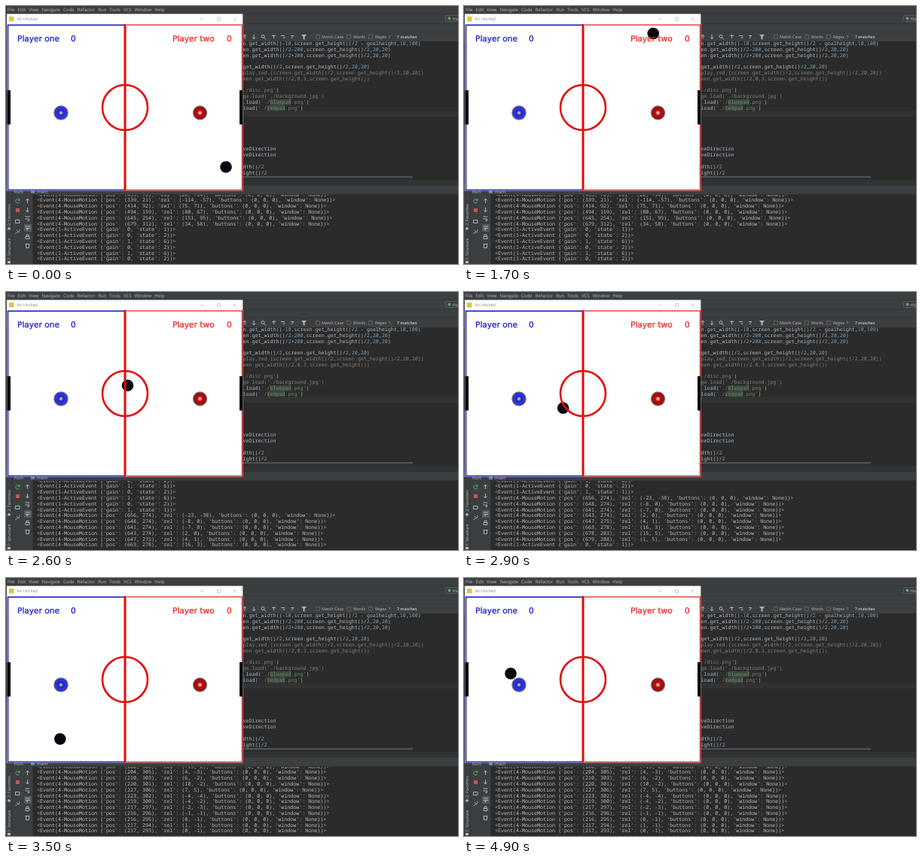
Animation, 600 px wide and 343 px high, one loop 5 s. Source, as an HTML page:

```html
<!DOCTYPE html>
<html lang="en">
<head>
<meta charset="utf-8">
<title>Air Hockey!</title>
<style>
html, body { margin: 0; width: 100%; height: 100%; overflow: hidden; background: #2b2b2b; }
svg { display: block; width: 600px; height: 343px; }
text { white-space: pre; text-rendering: geometricPrecision; }
.ui { font: 6px "Open Sans", "Noto Sans", sans-serif; fill: #bbb; }
.small { font-size: 5.4px; }
.mono { font: 6.68px "Noto Sans Mono", "DejaVu Sans Mono", monospace; fill: #a9b7c6; }
.score { font: 10.6px "DejaVu Sans", sans-serif; stroke-width: .3; }
.dim { fill: #808080; }
.str { fill: #748769; }
.num { fill: #7a9db8; }
.icons { fill: none; stroke: #afb1b3; }
</style>
</head>
<body>
<svg viewBox="0 0 600 343">
  <defs>
    <clipPath id="termClip"><rect x="36" y="251.2" width="564" height="92"/></clipPath>
    <clipPath id="fieldClip"><rect x="1" y="24" width="313" height="221.5"/></clipPath>
    <radialGradient id="blue">
      <stop offset="0" stop-color="#d0d4e0"/><stop offset=".2" stop-color="#8088c0"/>
      <stop offset=".35" stop-color="#2020b8"/><stop offset=".7" stop-color="#3434f0"/><stop offset="1" stop-color="#2020c0"/>
    </radialGradient>
    <radialGradient id="red">
      <stop offset="0" stop-color="#ffe0e0"/><stop offset=".2" stop-color="#e08080"/>
      <stop offset=".4" stop-color="#b00808"/><stop offset=".7" stop-color="#b40c0c"/><stop offset="1" stop-color="#860000"/>
    </radialGradient>
  </defs>

  <!-- editor -->
  <rect width="600" height="343" fill="#2b2b2b"/>
  <rect x="314" y="139.5" width="286" height="7.5" fill="#323232"/>
  <path d="M350.500 124h28v7.800h-28zM346.500 131.800h24v7.800h-24z" fill="#39453f"/>
  <g id="code" class="mono"></g>
  <rect x="314" y="226" width="226" height="2.500" fill="#4c4e50"/>

  <!-- menu, tool and find bars -->
  <rect width="600" height="47" fill="#3c3f41"/>
  <path d="M0 10.500H600M314 23.500H600M314 34.500H600" stroke="#343739"/>
  <text class="ui" x="2" y="6.600" style="word-spacing:2.540px">File Edit View Navigate Code Refactor Run Tools VCS Window Help</text>
  <rect x="583.500" y="12.500" width="20" height="8" rx="1" fill="none" stroke="#55585a"/>
  <circle cx="588.500" cy="16.500" r="2" fill="#59a869"/>
  <text class="ui" x="592.500" y="18.500">main</text>
  <g class="icons">
    <path d="M317 44V38l-2 2.500M317 38l2 2.500M329 38v6l-2-2.500M329 44l2-2.500M342.500 42l2.500 2.500"/>
    <circle cx="341" cy="40.500" r="2"/>
    <path d="M353 39.500h5M355.500 38v5M365 39.500h5M367.500 42h3M378 39.500h3M379 43l3-4"/>
    <path d="M411.500 38.500h5v5h-5zM452.500 38.500h5v5h-5zM481.500 38.500h5v5h-5z" stroke="#6b6b6b" stroke-width=".7"/>
  </g>
  <path d="M392 38h7l-2.500 3v4l-2-1v-3z" fill="#afb1b3"/>
  <g class="ui small">
    <text x="419" y="43">Match Case</text><text x="461" y="43">Words</text>
    <text x="490" y="43">Regex</text><text x="508" y="43">?</text>
    <text x="519" y="43" font-weight="700" style="font-size:5.200px">7 matches</text>
  </g>

  <!-- run panel -->
  <rect y="231" width="600" height="8" fill="#313335"/>
  <rect y="239" width="600" height="11" fill="#3c3f41"/>
  <rect y="239" width="36" height="104" fill="#3c3f41"/>
  <path d="M8.500 246V343M35.500 250V343M36 250.500H600" stroke="#323537"/>
  <text class="ui" x="11" y="249.200">Run:</text>
  <rect x="33" y="245" width="5" height="4" fill="#5f8db0"/>
  <text class="ui" x="41" y="249.200">main</text>
  <g class="ui small">
    <text transform="translate(6.200 292) rotate(-90)">2: Favorites</text>
    <text transform="translate(6.200 338) rotate(-90)">7: Structure</text>
    <path d="M4 293l.800 2h2l-1.600 1.200.600 2-1.800-1.200-1.800 1.200.600-2L1.200 295h2z"/>
    <rect x="2" y="339" width="4" height="3"/>
  </g>
  <rect x="24" y="290" width="10" height="10" fill="#55595b"/>
  <g class="icons">
    <path d="M17.500 257.500a2.700 2.700 0 1 0 .400 3M18 256v2.500h-2.500" stroke="#59a869"/>
    <path d="M28.500 262v-6l-2 2.500M28.500 256l2 2.500M28.500 268v6l-2-2.500M28.500 274l2-2.500"/>
    <path d="M25.500 280h6M25.500 283h5v2.500h-2M26 293h6M26 295.500h6M28.500 295v3l-1.500-1.500"/>
    <path d="M26 306.500h5v3h-5zM27 306v-2h3v2M26.500 317v4.500h4V317M25.500 316.500h6"/>
    <path d="M12.500 284.500h5.500v4h-5.500zM14 298l3.500 3.500M17 297l1.500 1.500-3 3M15 300.500l-2.500 2.500"/>
  </g>
  <rect x="13" y="269" width="5" height="5" fill="#c75450"/>
  <g id="term" class="mono" style="fill:#bbb" clip-path="url(#termClip)"></g>

  <!-- game window -->
  <rect x="1" y="10.500" width="313.300" height="235" fill="#fff"/>
  <rect x="4" y="14" width="6.500" height="6.500" fill="#d9c64a"/>
  <text class="ui small" x="14.500" y="19.200" style="fill:#888">Air Hockey!</text>
  <path d="M258 17.500h4M280.500 15.500h4v4h-4zM301.500 15.500l4 4m0-4l-4 4" fill="none" stroke="#aaa" stroke-width=".600"/>
  <g clip-path="url(#fieldClip)">
    <circle id="disc" r="7.800" fill="#04040c"/>
    <path d="M157 25.300H2.500V244.500H157" fill="none" stroke="#2424cc" stroke-width="1.700"/>
    <path d="M160 25.200H313.400V244.700H160" fill="none" stroke="#e02020" stroke-width="1.200"/>
    <g fill="none" stroke="#e60a0a">
      <path d="M158 24V246" stroke-width="3"/>
      <circle cx="158" cy="135" r="30" stroke-width="2.600"/>
    </g>
    <path d="M1.500 112H6v45.500H1.500zM310 112h4v45.500h-4z"/>
    <g stroke="#6f747c" stroke-width="1.300">
      <circle cx="73" cy="142" r="9.100" fill="url(#blue)"/>
      <circle cx="257.500" cy="142" r="9" fill="url(#red)"/>
    </g>
    <g class="score" fill="#2222c4" stroke="#2222c4"><text x="15" y="47.300">Player one</text><text x="86" y="47.300">0</text></g>
    <g class="score" fill="#ee2a2a" stroke="#ee2a2a"><text x="221" y="47.300">Player two</text><text x="293" y="47.300">0</text></g>
  </g>
</svg>
<script>
const $ = id => document.getElementById(id);

function addTag(parent, tag, str, attrs = {}) {
  const el = document.createElementNS("http://www.w3.org/2000/svg", tag);
  for (const name in attrs) el.setAttribute(name, attrs[name]);
  el.textContent = str;
  parent.append(el);
  return el;
}

// Visible part of the edited file; "#" marks a commented line
const code = `n.get_width()-10,screen.get_height()/2 - goalheight,10,100)
en.get_width()/2-200,screen.get_height()/2,20,20)
en.get_width()/2+200,screen.get_height()/2,20,20)

get_width()/2,screen.get_height()/2,20,20)
#play,red,[screen.get_width()/2,screen.get_height()/2,20,20])
#een.get_width()/2,0,3,screen.get_height())

./disc.png')
#ge.load('./background.jpg')
.load('./bluepad.png')
load('./redpad.png')






veDirection
veDirection

dth()/2
ight()/2`;

code.split("\n").forEach((line, row) => {
  const dim = line[0] === "#";
  const text = addTag($("code"), "text", "", { x: 314.5, y: 51.9 + 7.8 * row });
  for (const part of line.replace("#", "").split(/('?\.\/.*'|\b\d+)/)) {
    const kind = dim ? "dim" : /'$/.test(part) ? "str" : /^\d/.test(part) ? "num" : "";
    addTag(text, "tspan", part, { class: kind });
  }
});

// Event log: the pointer position is the running sum of its moves
const log = [];
let mx = 433, my = 92;
const move = (...deltas) => deltas.forEach(([dx, dy]) => {
  mx += dx;
  my += dy;
  log.push(`<Event(4-MouseMotion {'pos': (${mx}, ${my}), 'rel': (${dx}, ${dy}), 'buttons': (0, 0, 0), 'window': None})>`);
});
const active = (...events) => events.forEach(([gain, state]) =>
  log.push(`<Event(1-ActiveEvent {'gain': ${gain}, 'state': ${state}})>`));
const enter = [1, 1], leave = [0, 1], blur = [0, 2], focus = [1, 6];

move([20, -14], [-114, -57], [75, 71], [80, 67], [151, 95], [34, 58]);
active(leave, blur, focus, blur, focus, blur, enter);
move([-23, -38], [-8, 0], [-7, 0], [2, 0], [4, 1], [16, 3], [15, 5], [1, 5]);
active(leave, enter);
move([-35, -3], [-142, 5], [-160, 2], [-73, 7], [-50, 7], [-19, 2], [4, -3], [6, -2], [10, -2],
  [7, 5], [-4, -4], [-4, -2], [-2, -3], [-1, -1], [0, -1], [1, -1], [0, -1]);

const rows = Array.from({ length: 12 }, (_, i) =>
  addTag($("term"), "text", "", { x: 41, y: 252.6 + 7.8 * i }));

// Keys are [step, value], linear in between; the disc's keys are its bounces
const stepMs = 100, steps = 50;
const discX = [[0, 292], [1.8, 310], [6.5, 264], [11.1, 310], [41, 12], [47.5, 77], [49, 62]];
const discY = [[0, 214], [17.1, 35.5], [37.7, 241], [49, 127]];
const scroll = [[0, 0], [19, 0], [22, 4], [29, 10], [33, 23], [35, 28], [49, 28]];

function at(keys, s) {
  const i = Math.max(1, keys.findIndex(k => k[0] >= s));
  const [s0, v0] = keys[i - 1], [s1, v1] = keys[i];
  return v0 + (v1 - v0) * (s - s0) / (s1 - s0);
}

let shown = -1;
function draw() {
  const step = Math.floor(performance.now() / stepMs) % steps;
  if (step !== shown) {
    shown = step;
    $("disc").setAttribute("cx", at(discX, step));
    $("disc").setAttribute("cy", at(discY, step));
    const top = Math.round(at(scroll, step));
    rows.forEach((row, i) => row.textContent = log[top + i]);
  }
  requestAnimationFrame(draw);
}
draw();
</script>
</body>
</html>
```
